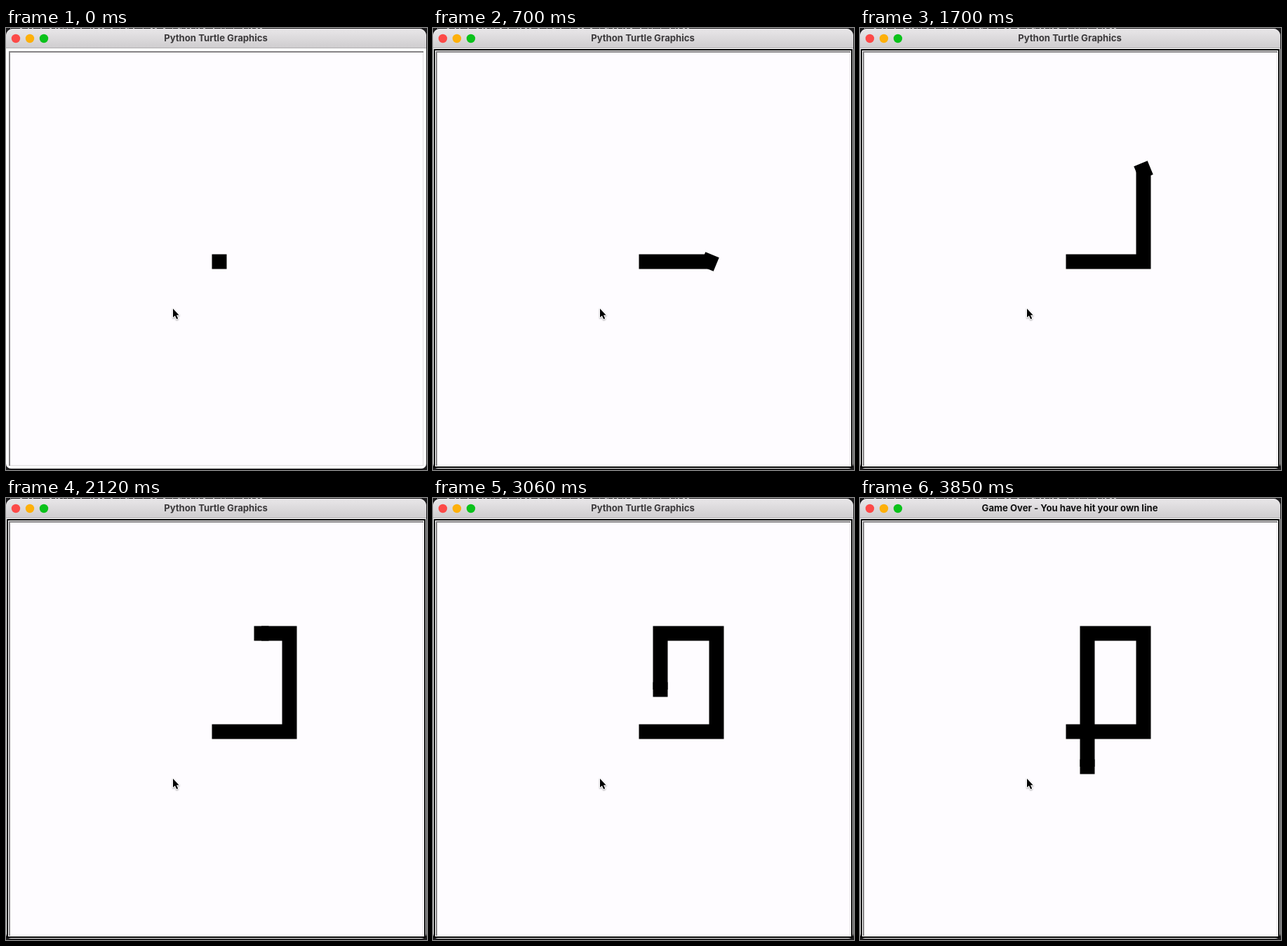
Animation, 600 px wide and 630 px high, one loop 3.91 s. Source, as an HTML page with a canvas:

```html
<!DOCTYPE html>
<html lang="en">
<head>
<meta charset="utf-8">
<title>Turtle line game</title>
<style>
  html, body { margin: 0; width: 600px; height: 630px; overflow: hidden; background: #1c1b1d; }
  canvas { display: block; }
</style>
</head>
<body>
<canvas id="stage" width="600" height="630"></canvas>
<script>
const ctx = document.getElementById('stage').getContext('2d');
const LOOP = 3910, SIZE = 21, HOP = 10, TICK = 30;
const TURN = 4 * TICK;

// A move is two hops, one move per pace. A leg's last move may be a turn:
// the head spins left between its two hops.
const legs = [
  { dx: 1, dy: 0, moves: 5, start: 30, pace: 120, turn: 610 },
  { dx: 0, dy: -1, moves: 7, start: 880, pace: 132, turn: 1670 },
  { dx: -1, dy: 0, moves: 4, start: 1940, pace: 150, turn: 2400 },
  { dx: 0, dy: 1, moves: 6, start: 2670, pace: 120 },
  { dx: 0, dy: 1, moves: 4, start: 3420, pace: 140 }
];
const focusTime = legs[0].start;
const overTime = 3420 + 3 * 140 + TICK / 3;

function hopsDone(leg, t) {
  let hops = 0;
  for (let i = 0; i < leg.moves; i++) {
    const turning = leg.turn && i === leg.moves - 1;
    const first = turning ? leg.turn : leg.start + i * leg.pace;
    const second = first + TICK + (turning ? TURN : 0);
    hops += (t >= first) + (t >= second);
  }
  return hops;
}

function headAngle(t) {
  const leg = legs.find(l => t >= l.turn + TICK && t < l.turn + TURN);
  return leg ? -Math.floor((t - leg.turn) / TICK) * Math.PI / 8 : 0;
}

function rect(color, x, y, w, h) {
  ctx.fillStyle = color;
  ctx.fillRect(x, y, w, h);
}

function drawWindow(focused, over) {
  rect('#1c1b1d', 0, 0, 600, 630);
  // Feet of letters from the window behind
  for (let x = 6; x < 370; x += 4 + (x * 7) % 5) {
    if (x % 11 > 2) rect('#aaa', x, 0, 1 + x % 3, 1);
  }

  ctx.save();
  ctx.beginPath();
  ctx.roundRect(0, 1, 599, 627, [10, 10, 7, 7]);
  ctx.clip();
  rect('#fff', 0, 0, 600, 630);
  const bar = ctx.createLinearGradient(0, 1, 0, 28);
  bar.addColorStop(0, '#e9e7e9');
  bar.addColorStop(1, '#cfcdcf');
  rect(bar, 0, 1, 600, 27);
  rect('#b1afb1', 0, 28, 600, 1);
  ctx.restore();

  ['#fc4a48', '#fdb00b', '#0bc21b'].forEach((color, i) => {
    ctx.fillStyle = color;
    ctx.beginPath();
    ctx.arc(14 + 20 * i, 15, 6.2, 0, 7);
    ctx.fill();
  });

  ctx.font = '700 13.15px Inter, sans-serif';
  ctx.textAlign = 'center';
  ctx.fillStyle = over ? '#111' : '#3c3a3c';
  ctx.fillText(over ? 'Game Over - You have hit your own line' : 'Python Turtle Graphics', 299, 19);

  if (focused) {
    ctx.strokeStyle = '#000';
    ctx.lineWidth = 2;
    ctx.strokeRect(2, 31, 595, 595);
  }
  rect('#fefcff', 4, 33, 591, 591);
  rect('#dedcde', 594, 33, 1, 591);
  rect('#dedcde', 4, 623, 591, 1);
  rect('#858385', 4, 33, 591, 2);
  rect('#858385', 4, 33, 2, 591);
}

function drawSnake(t) {
  let x = 304, y = 333;
  ctx.beginPath();
  ctx.moveTo(x - SIZE / 2, y);
  for (const leg of legs) {
    const d = HOP * hopsDone(leg, t);
    if (!d) break;
    x += leg.dx * d;
    y += leg.dy * d;
    ctx.lineTo(x, y);
  }
  ctx.strokeStyle = ctx.fillStyle = '#000';
  ctx.lineWidth = SIZE;
  ctx.lineJoin = 'miter';
  ctx.stroke();

  ctx.save();
  ctx.translate(x, y);
  ctx.rotate(headAngle(t));
  ctx.fillRect(-SIZE / 2, -SIZE / 2, SIZE, SIZE);
  ctx.restore();
}

function drawPointer() {
  const arrow = new Path2D('M238 400V412.6L240.9 410L243.2 415L245.2 414.1L243 409.2H246.6Z');
  ctx.save();
  ctx.lineJoin = 'round';
  ctx.lineWidth = 2;
  ctx.strokeStyle = '#fff';
  ctx.shadowColor = 'rgba(0,0,0,.35)';
  ctx.shadowBlur = 2;
  ctx.shadowOffsetY = 1;
  ctx.stroke(arrow);
  ctx.restore();
  ctx.fillStyle = '#000';
  ctx.fill(arrow);
}

const begin = performance.now();
function tick() {
  const t = (performance.now() - begin) % LOOP;
  drawWindow(t >= focusTime, t >= overTime);
  drawSnake(t);
  drawPointer();
  requestAnimationFrame(tick);
}
tick();
</script>
</body>
</html>
```
